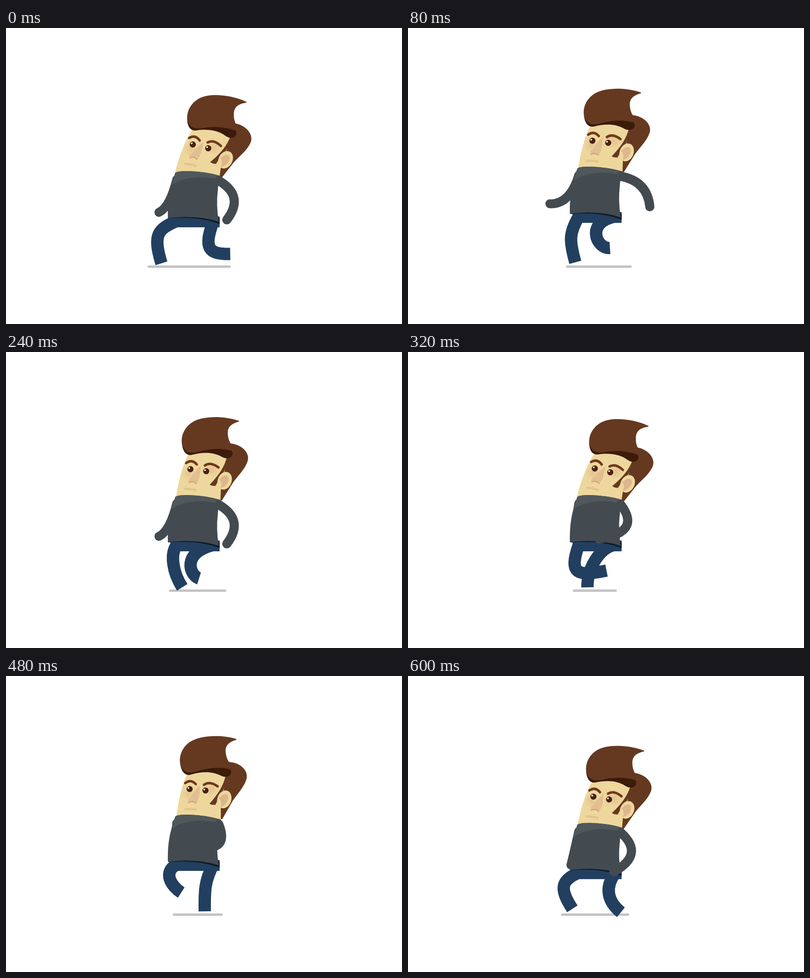
An HTML page with a canvas that plays this animation: 800x600 px, repeating every 0.64 s.

```html
<!DOCTYPE html>
<html>
<head>
<meta charset="utf-8">
<style>
html, body { margin: 0; width: 100%; height: 100%; overflow: hidden; background: #fff; }
canvas { display: block; }
</style>
</head>
<body>
<canvas id="stage" width="800" height="600"></canvas>
<script>
const ctx = document.getElementById('stage').getContext('2d');
const STEP = 40, STEPS = 16;
const HAIR = '#653920', HAIR_DARK = '#3b1b0a', SKIN = '#eed79d', SHADE = '#ddb78c';
const SWEATER = '#434a50', COLLAR = '#50585b', JEANS = '#223f60', BELT = '#0c1a2b';

// Walk poses: two curve handles and the foot for each leg, then the shadow ends
const poses = [
  { k: 0,  left: [307, 408, 296, 418, 314, 477], right: [399, 446, 408, 459, 453, 458], shadow: [286, 454] },
  { k: 2,  left: [325, 416, 326, 432, 338, 475], right: [358, 393, 380, 448, 408, 446], shadow: [319, 452] },
  { k: 4,  left: [334, 426, 332, 434, 344, 477], right: [350, 392, 370, 449, 397, 446], shadow: [328, 452] },
  { k: 6,  left: [331, 410, 337, 447, 356, 477], right: [354, 407, 371, 453, 390, 459], shadow: [329, 445] },
  { k: 8,  left: [324, 451, 342, 455, 401, 443], right: [386, 396, 362, 440, 362.5, 477], shadow: [333, 422] },
  { k: 12, left: [315, 398, 335, 427, 354, 439], right: [401, 415, 401, 437, 401.5, 477], shadow: [337, 438] },
  { k: 15, left: [308, 414, 306, 432, 332, 472], right: [397, 428, 402, 456, 430, 479], shadow: [309, 447] }
];

const wrap = n => (n + STEPS) % STEPS;

// Smooth periodic interpolation of one part of the pose
function pose(part, k) {
  const n = poses.length;
  let i = n - 1;
  while (poses[i].k > k) i--;
  const [a, b, c, d] = [-1, 0, 1, 2].map(j => poses[(i + j + n) % n]);
  const before = wrap(b.k - a.k), span = wrap(c.k - b.k), after = wrap(d.k - c.k);
  const u = (k - b.k) / span, u2 = u * u, u3 = u2 * u;
  return b[part].map((v, j) => {
    const w = c[part][j];
    const m0 = (w - a[part][j]) / (before + span) * span;
    const m1 = (d[part][j] - v) / (span + after) * span;
    return (2 * u3 - 3 * u2 + 1) * v + (u3 - 2 * u2 + u) * m0 + (3 * u2 - 2 * u3) * w + (u3 - u2) * m1;
  });
}

function fill(path, color) {
  ctx.fillStyle = color;
  ctx.fill(new Path2D(path));
}

function stroke(path, color, width, cap = 'round') {
  ctx.strokeStyle = color;
  ctx.lineWidth = width;
  ctx.lineCap = cap;
  ctx.stroke(new Path2D(path));
}

function oval(x, y, rx, ry, color, turn = 0) {
  ctx.fillStyle = color;
  ctx.beginPath();
  ctx.ellipse(x, y, rx, ry, turn, 0, 7);
  ctx.fill();
}

function glow(x, y, r, alpha) {
  const g = ctx.createRadialGradient(x, y, 0, x, y, r);
  g.addColorStop(0, `rgba(214,165,125,${alpha})`);
  g.addColorStop(1, 'rgba(214,165,125,0)');
  oval(x, y, r, r, g);
}

function drawHead() {
  // back hair and face
  fill('M448 174C476 175 490 194 486 208C482 224 468 238 458 253L437 290H430V215Z', HAIR);
  fill('M368 195C357 215 348 248 343 298H434L434 262L446 200L410 188Z', SKIN);
  glow(368, 238, 15, .4);
  glow(414, 228, 17, .4);

  // nose and mouth
  fill('M391 221C392 235 391 246 385 258Q376 252 368 256C365 250 374 247 377 238Z', '#e2bf92');
  stroke('M369 257Q377 252 384 258', '#cb935f', 1.5);
  stroke('M361.5 270Q372 269 383 271', '#e2c48d', 4.5);

  for (const [x, y] of [[371, 229], [403, 232]]) {
    oval(x, y, 6.2, 6.2, '#4a2110');
    oval(x - 2.5, y - 2, 1.8, 1.8, '#fff');
  }
  stroke('M362 217Q373 208 383.5 219', '#70391b', 5);
  stroke('M400 220.5Q411 212 427.500 223.5', '#70391b', 5);

  // sideburn and ear
  fill('M444 200C440 222 428 240 411 259Q416 262 423 261C428 251 430 246 437 236L452 200Z', HAIR);
  oval(441, 250, 14, 18.5, SKIN, .33);
  fill('M430 248C438 237 449 236 449 246C449 257 439 265 433 265C437 259 434 252 430 248Z', SHADE);

  // quiff with its dark underside
  fill('M352 178C354 194 362 203 373 200C396 193 417 193 434 202C446 208 456 202 455 193L448 180L380 175Z', HAIR_DARK);
  fill('M466 129C449 134 442 142 444 156C445 164 447 169 451 175L453 189C435 184 410 186 393 191C376 197 361 200 353 182' +
       'C348 166 354 146 371 134C391 120 434 118 465 127.5Z', HAIR);
}

function drawLeg(part, hipX, hipY, k) {
  stroke(`M${hipX} ${hipY}C${pose(part, k)}`, JEANS, 25, 'butt');
}

function draw(k) {
  const bodyPhase = (k + 1) % 8 - 4, headPhase = k % 8 - 4;
  const bob = 1.11 * bodyPhase ** 2;
  const tilt = .148 * headPhase ** 2 / 16;
  const swing = Math.cos((k - 3) * Math.PI / 8), swing2 = swing * swing;

  ctx.fillStyle = '#fff';
  ctx.fillRect(0, 0, 800, 600);

  const [from, to] = pose('shadow', k);
  stroke(`M${from + 2.5} 483.700H${to - 2.5}`, '#c4c4c4', 5);
  drawLeg('left', 345, 381 + bob, k);
  drawLeg('right', 419, 381 + bob, k);

  ctx.save();
  ctx.translate(0, bob);
  fill('M329 372H431.5V394H343Z', JEANS);

  ctx.save();
  ctx.translate(387, 270);
  ctx.rotate(tilt);
  ctx.translate(-387, -271);
  drawHead();
  ctx.restore();

  fill('M328 372V376Q390 371 431.5 387.5V375Z', BELT);
  const handX = 329 - 57 * swing + 12 * swing2, handY = 365.5 - 12 * swing2;
  stroke(`M345 297Q${333 - 6 * swing} ${351 + 6 * swing} ${handX} ${handY}`, SWEATER, 18);
  fill('M342 284Q345 280 368 280Q405 281 434 290L434 300Q428 305 428 318Q424 350 430 383' +
       'Q385 368 327 375.5Q326 335 335 306Z', SWEATER);
  const reachX = Math.max(350, 416 + 78.5 * swing), reachY = 379 + 13 * swing - 35 * swing2;
  stroke(`M430 299.5Q${479 + 14 * swing - 10 * swing2} ${344 - 32 * swing - 6 * swing2} ${reachX} ${reachY}`, SWEATER, 18.5);
  fill('M342 284Q345 280 368 280Q402 281 428 288.5Q424 293 421 295.5C388 288 351 295 334 309Z', COLLAR);
  ctx.restore();
}

function tick() {
  draw(Math.floor((performance.now() - start) / STEP) % STEPS);
  requestAnimationFrame(tick);
}

const start = performance.now();
tick();
</script>
</body>
</html>
```
